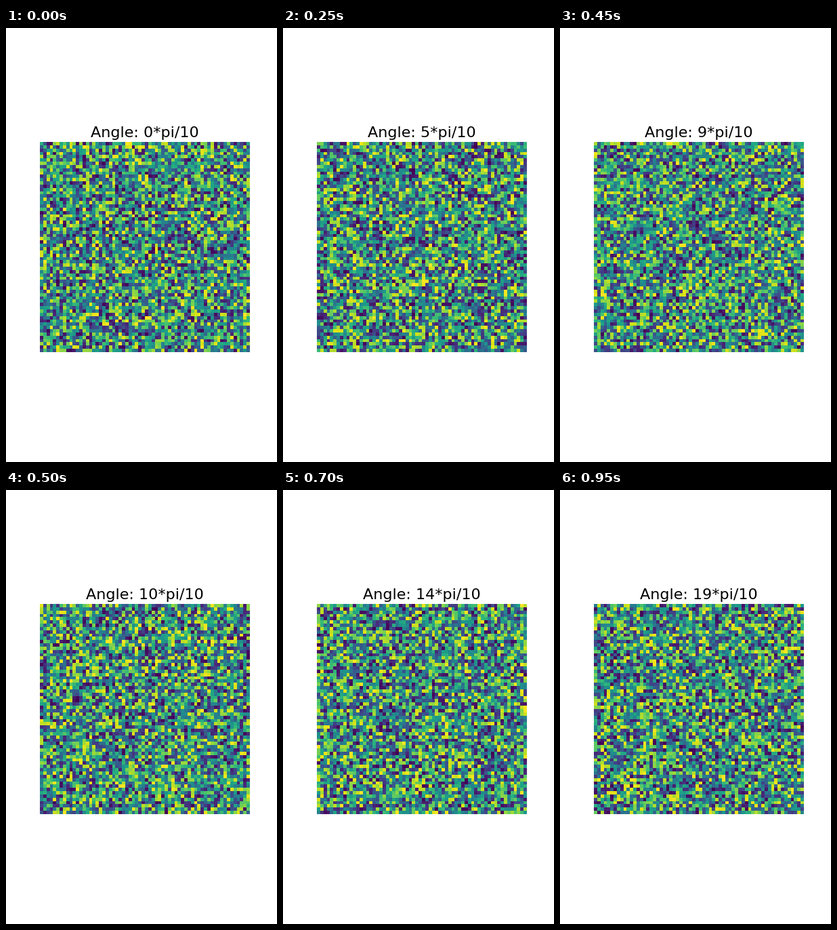
Write a matplotlib script that moves like this. It is 400 px wide and 640 px high and loops after 1000 ms.

```python
import matplotlib.pyplot as plt
import numpy as np
from matplotlib.animation import FuncAnimation

STEPS = 20
LOOP_MS = 1000
CELLS = 64

plt.rcParams["font.family"] = "DejaVu Sans"


def noise(step):
    """Fresh uniform noise, fixed for each step."""
    return np.random.default_rng(step).random((CELLS, CELLS))


fig, ax = plt.subplots(figsize=(4, 6.4), dpi=100, facecolor="white")
fig.subplots_adjust(left=0.125, right=0.9, bottom=0.11, top=0.88)
ax.axis("off")
image = ax.imshow(noise(0), cmap="viridis", vmin=0, vmax=1)
title = ax.set_title("", fontsize=16, pad=5)


def update(step):
    image.set_data(noise(step))
    title.set_text(f"Angle: {step}*pi/10")
    return image, title


anim = FuncAnimation(fig, update, frames=STEPS, interval=LOOP_MS / STEPS,
                     repeat=True, repeat_delay=0, blit=False)
plt.show()
```
